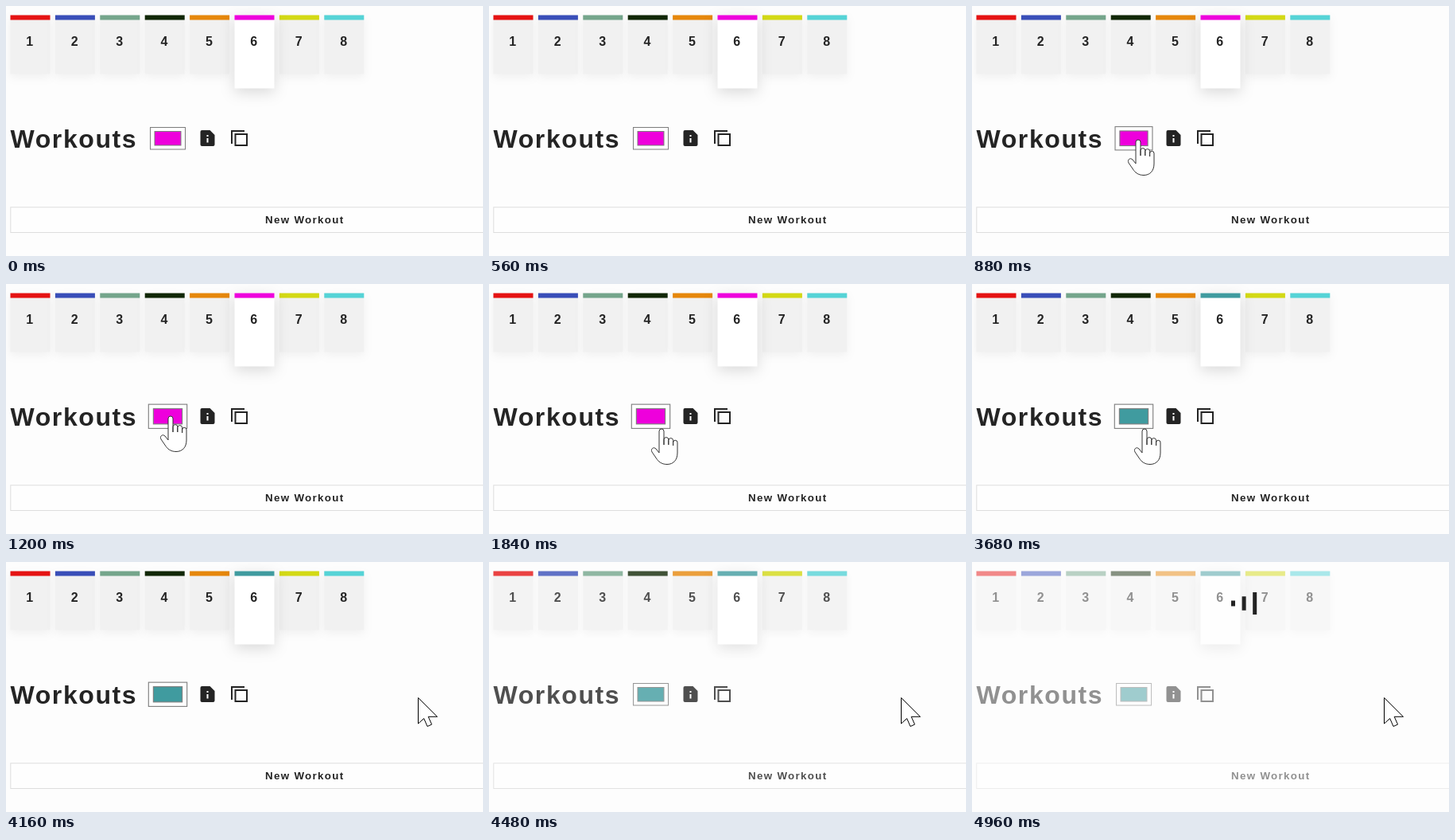
Animation, 600 px wide and 314 px high, one loop 5040 ms. Source, as an HTML page:

```html
<!DOCTYPE html>
<html lang="en">
<head>
<meta charset="utf-8">
<title>Workouts</title>
<style>
  html, body { margin: 0; height: 100%; overflow: hidden; background: #fdfdfd; }
  svg { display: block; width: 600px; height: 314px; }
  text { font-family: "Liberation Sans", Arial, sans-serif; font-weight: bold; fill: #242424; }
  .tab { filter: drop-shadow(0 4px 6px rgba(0, 0, 0, .05)); }
  .active { filter: drop-shadow(0 5px 9px rgba(0, 0, 0, .14)); }
  .cursor { fill: #fff; stroke-linejoin: round; }
</style>
</head>
<body>
<svg viewBox="0 0 600 314">
  <g id="page">
    <g id="tabs"></g>
    <text x="5.5" y="177.5" font-size="32" letter-spacing="1.6">Workouts</text>
    <g id="swatch" stroke="#7c7c7c">
      <rect x="181.5" y="152.5" width="44" height="27.5" fill="#fff"/>
      <rect id="fill" x="187" y="157.5" width="33" height="17.5"/>
    </g>
    <path d="M246.5 156H256.5L262.5 162V174a2 2 0 0 1-2 2H246.5a2 2 0 0 1-2-2V158a2 2 0 0 1 2-2z" fill="#242424"/>
    <path d="M252.5 162h2v2h-2zM252.5 166h2v5.5h-2z" fill="#fff"/>
    <path d="M284 173V157H300M288.5 161H303V175H288.5z" fill="none" stroke="#242424" stroke-width="2"/>
    <rect x="5.8" y="252.8" width="740" height="31.7" fill="#fefefe" stroke="#ddd"/>
    <text x="326" y="273" font-size="13.333" letter-spacing="1.333">New Workout</text>
  </g>
  <g id="loader" fill="#222"></g>
  <path id="hand" class="cursor" stroke="#333" d="M-3 30V3a3 3 0 0 1 6 0V20V13.5a2.9 2.9 0 0 1 5.8 0V20V14.5a2.9 2.9 0 0 1 5.8 0V21V17a2.7 2.7 0 0 1 5.4 0V30C20 39 15 44.5 7 44.5C0 44.5-4 41-6.5 37L-12 29C-14 25-10 22-7 25L-3 30"/>
  <path id="arrow" class="cursor" stroke="#000" d="M.5.5V33L7.7 26.5L12 36.5L17.5 34L13.2 24.3H24.5Z"/>
</svg>
<script>
const LOOP = 5040, STEP = 80, ACTIVE = 5, BARS = 8;
const MAGENTA = "#ee00dc", TEAL = "#409b9f";
const COLORS = ["#e51313", "#394eb8", "#74a58b", "#112706", "#e6870c", MAGENTA, "#d3d915", "#55d3d6"];
// time, x, y of the pointer's tip
const PATH = [[720, 214, 177], [880, 209, 168], [1200, 207, 166], [1600, 207, 166],
  [1840, 217, 182], [3920, 217, 182], [4160, 518, 170]];

const $ = id => document.getElementById(id);
const ramp = (t, from, to) => Math.min(1, Math.max(0, (t - from) / (to - from)));
const smooth = p => p * p * (3 - 2 * p);

function add(parent, tag, attrs, text = "") {
  const el = document.createElementNS("http://www.w3.org/2000/svg", tag);
  for (const name in attrs) el.setAttribute(name, attrs[name]);
  el.textContent = text;
  return parent.appendChild(el);
}

function addTab(i) {
  const on = i === ACTIVE, x = 5.5 + 56.4 * i;
  const g = add($("tabs"), "g", { class: on ? "active" : "tab" });
  add(g, "rect", { x, y: 11.5, width: 50, height: on ? 92 : 74, fill: on ? "#fff" : "#f1f1f1" });
  add(g, "text", { x: x + 24.3, y: 50, "font-size": 16, "text-anchor": "middle" }, i + 1);
  return add(g, "rect", { x, y: 11.5, width: 50, height: 6, fill: COLORS[i] });
}

// the active tab goes last so that its shadow falls on its neighbours
COLORS.forEach((_, i) => { if (i !== ACTIVE) addTab(i); });
const activeStrip = addTab(ACTIVE);
const bars = Array.from({ length: BARS }, (_, i) =>
  add($("loader"), "rect", { x: 326 + 13.6 * i, width: 5 }));

function pointer(t) {
  const i = Math.max(1, PATH.findIndex(k => k[0] >= t));
  const n = t >= PATH.at(-1)[0] ? PATH.length - 1 : i;
  const [a, b] = [PATH[n - 1], PATH[n]];
  const p = smooth(ramp(t, a[0], b[0]));
  return [a[1] + (b[1] - a[1]) * p, a[2] + (b[2] - a[2]) * p];
}

function draw(now) {
  const t = Math.floor(now % LOOP / STEP) * STEP;

  const color = t < 2800 ? MAGENTA : TEAL;
  activeStrip.setAttribute("fill", color);
  $("fill").setAttribute("fill", color);

  const scale = 1 + 0.1 * (ramp(t, 720, 960) - ramp(t, 4240, 4480));
  $("swatch").setAttribute("transform", `translate(203.5 166.2) scale(${scale}) translate(-203.5 -166.2)`);
  $("page").setAttribute("opacity", 1 - 0.5 * smooth(ramp(t, 4240, 4800)));

  bars.forEach((bar, i) => {
    const age = (t - 4800) / STEP - i;
    const h = age < 0 ? 0 : Math.max(0, 28 - 10.5 * age);
    bar.setAttribute("y", 52 - h / 2);
    bar.setAttribute("height", h);
  });

  const [x, y] = pointer(t), away = x > 228;
  for (const id of ["hand", "arrow"]) {
    const shown = t >= PATH[0][0] && away === (id === "arrow");
    $(id).setAttribute("visibility", shown ? "visible" : "hidden");
    $(id).setAttribute("transform", `translate(${x} ${y})`);
  }
}

function tick() {
  draw(performance.now());
  requestAnimationFrame(tick);
}
tick();
</script>
</body>
</html>
```
